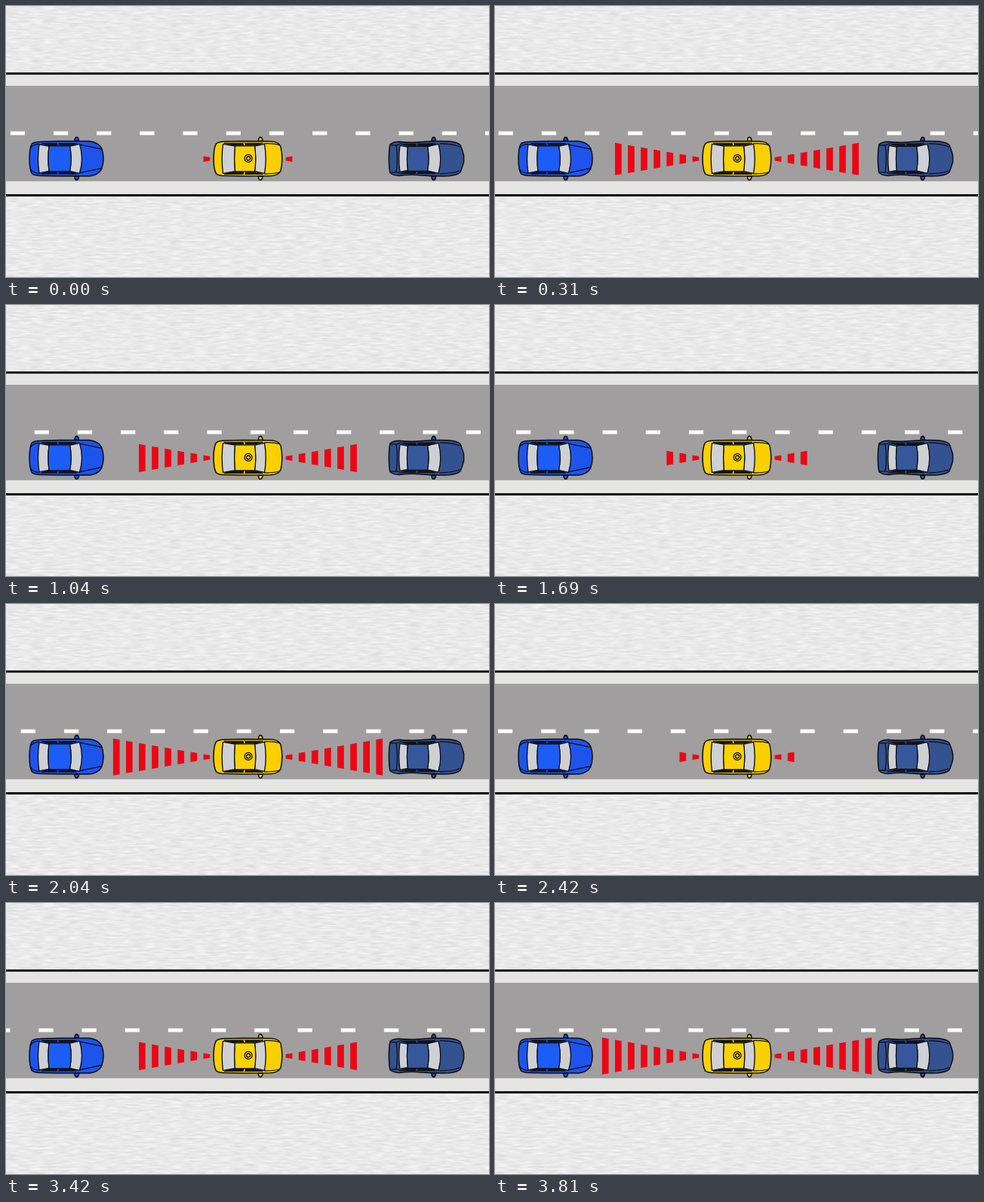
Write an HTML page that moves like this. It is 640 px wide and 360 px high and loops after 3850 ms.

```html
<!DOCTYPE html>
<html lang="en">
<head>
<meta charset="utf-8">
<title>Distance sensors</title>
<style>
  html, body { margin: 0; width: 100%; height: 100%; overflow: hidden; background: #e9e9e9; }
  svg { display: block; width: 100vw; height: 100vh; }
</style>
</head>
<body>
<svg viewBox="0 0 640 360">
  <defs>
    <filter id="paper" x="0" y="0" width="100%" height="100%" color-interpolation-filters="sRGB">
      <feTurbulence type="fractalNoise" baseFrequency=".06 .4" numOctaves="2" seed="4"/>
      <feColorMatrix values=".14 0 0 0 .845  .14 0 0 0 .845  .14 0 0 0 .845  0 0 0 0 1"/>
    </filter>
  </defs>
  <rect width="640" height="360" fill="#e9e9e9" filter="url(#paper)"/>
  <rect y="88.3" width="640" height="164.7" fill="#080808"/>
  <rect y="91.2" width="640" height="158.8" fill="#e5e5e4"/>
  <rect y="106" width="640" height="126.8" fill="#a09e9f"/>
  <path id="lane" stroke="#fbfbf8" stroke-width="5"/>
  <path id="beam" fill="#ee0513"/>
  <g id="cars" stroke="#0a0c12" stroke-width="1.5" stroke-linejoin="round" stroke-linecap="round"></g>
</svg>
<script>
const $ = id => document.getElementById(id);
const LOOP = 3850, FPS = 26;
const PITCH = 57.2, SPEED = 7.29;
const CYCLE = 20.5, STEP = 1.25, BARS = 8;
const MID = 320.5, AXIS = 203.3;

const both = half => `${half}<g transform="scale(1 -1)">${half}</g>`;

// Cars face right; each is drawn around its long axis.
function car(x, o) {
  const side = `
    <path d="M${o.mirror - 3} -23.5Q${o.mirror - 3} -28.5 ${o.mirror} -28.5Q${o.mirror + 2.5} -27.5 ${o.mirror + 2.5} -23.5Z" fill="${o.paint}"/>
    <path d="${o.window}" fill="#15171c" stroke-width="1"/>
    <path d="${o.pillar}" stroke="${o.paint}" stroke-width="1.6"/>
    <path d="${o.lines}" fill="none" stroke-width="1.2"/>`;
  const body = `<path d="${o.body}" fill="${o.paint}"/>`;
  const glass = `<path d="${o.glass}" fill="#cfd0d3" stroke-width="1.3"/>`;
  const roof = `<path d="${o.roof}" fill="${o.top}" stroke-width="1.2"/>`;
  return `<g transform="translate(${x} 202.8)">${body}${both(side)}${glass}${roof}${o.extra || ''}</g>`;
}

$('cars').innerHTML = [
  car(30.5, {
    paint: '#1d55ec', top: '#1b5df5', mirror: 63.5,
    body: 'M4 -20Q8 -22.6 15 -22.6L40 -23.3L80 -23.2Q92 -21.5 96 -14Q98.6 -8 98.6 0Q98.6 8 96 14Q92 21.5 80 23.2L40 23.3L15 22.6Q8 22.6 4 20Q.6 15 .6 0Q.6 -15 4 -20Z',
    window: 'M17 -20.3L63 -20.3L55 -17.8L26 -17.5Z',
    pillar: 'M38 -20L39 -17.8',
    lines: 'M66 -19L97 -12.5M2 -14Q5 -19 13 -19.5',
    glass: 'M13.5 -19L26.5 -16.5Q24.5 0 26.5 16.5L13.5 19Q10.5 0 13.5 -19ZM54 -16.5L67 -19.5Q73 0 67 19.5L54 16.5Q57.5 0 54 -16.5Z',
    roof: 'M26.5 -17L54 -17Q57.5 0 54 17L26.5 17Q24.5 0 26.5 -17Z'
  }),
  car(274.5, {
    paint: '#fbd000', top: '#fcd200', mirror: 63,
    body: 'M4 -20Q8 -22.8 16 -22.8L40 -23.3L76 -23Q87 -22.5 89.5 -16Q91.3 -8 91.3 0Q91.3 8 89.5 16Q87 22.5 76 23L40 23.3L16 22.8Q8 22.8 4 20Q.6 14 .6 0Q.6 -14 4 -20Z',
    window: 'M15 -20.6L66 -20.6L56 -18L28 -17.6Z',
    pillar: 'M41 -20.3L41.5 -18',
    lines: 'M68 -20Q80 -20.5 88 -18',
    glass: 'M13 -19.5L29 -16.8Q27.5 0 29 16.8L13 19.5Q10.5 0 13 -19.5ZM55 -16.8L68 -19.5Q71.5 0 68 19.5L55 16.8Q57.5 0 55 -16.8Z',
    roof: 'M29 -17L55 -17Q57.5 0 55 17L29 17Q27.5 0 29 -17Z',
    extra: '<g fill="#e8be10" stroke-width="1.2"><circle cx="46.6" cy="-.4" r="5"/><circle cx="46.6" cy="-.4" r="2.5"/></g>'
  }),
  car(507, {
    paint: '#34528f', top: '#36579b', mirror: 60,
    body: 'M2 -19Q6 -22.5 14 -22.6Q30 -20.5 44 -22.2Q60 -23.6 80 -23Q91 -22 95 -18Q98.5 -9 99.6 -4L99.6 4Q98.5 9 95 18Q91 22 80 23Q60 23.6 44 22.2Q30 20.5 14 22.6Q6 22.5 2 19Q.4 12 .4 0Q.4 -12 2 -19Z',
    window: 'M17 -19.5L62 -20L53 -17.3L27 -16.5Z',
    pillar: 'M37 -19.3L38 -17',
    lines: 'M2 -18L10 -18Q11.5 -9 11.5 0M11 -18L16 -20M68 -20Q84 -20 94 -16',
    glass: 'M15 -17.5L25.5 -15.5Q23.5 0 25.5 15.5L15 17.5Q12.5 0 15 -17.5ZM51.5 -16L66 -19.5Q71.5 0 66 19.5L51.5 16Q54.5 0 51.5 -16Z',
    roof: 'M25.5 -16.5L51.5 -16.5Q54.5 0 51.5 16.5L25.5 16.5Q23.5 0 25.5 -16.5Z'
  })
].join('');

// One slice of the cone on either side of the middle car.
function bar(i) {
  const near = 50.2 + 17.1 * i, far = near + 8.7;
  const half = d => 2.2 + (d - 50.2) * .174;
  const a = half(near), b = half(far);
  return [-1, 1].map(s =>
    `M${MID + s * near} ${AXIS - a}L${MID + s * far} ${AXIS - b}V${AXIS + b}L${MID + s * near} ${AXIS + a}Z`
  ).join('');
}
const bars = Array.from({ length: BARS }, (_, i) => bar(i));

function draw(ms) {
  const n = Math.floor((ms % LOOP + 5) * FPS / 1000) % 100;

  let x = (5.7 - n * SPEED) % PITCH - PITCH, lane = '';
  for (; x < 640; x += PITCH) lane += `M${x.toFixed(2)} 169h19.3`;
  $('lane').setAttribute('d', lane);

  const level = Math.min(BARS, 1 + Math.floor((n % CYCLE + .3) / STEP));
  $('beam').setAttribute('d', bars.slice(0, level).join(''));
}

const start = performance.now();
function tick() {
  draw(performance.now() - start);
  requestAnimationFrame(tick);
}
tick();
</script>
</body>
</html>
```
